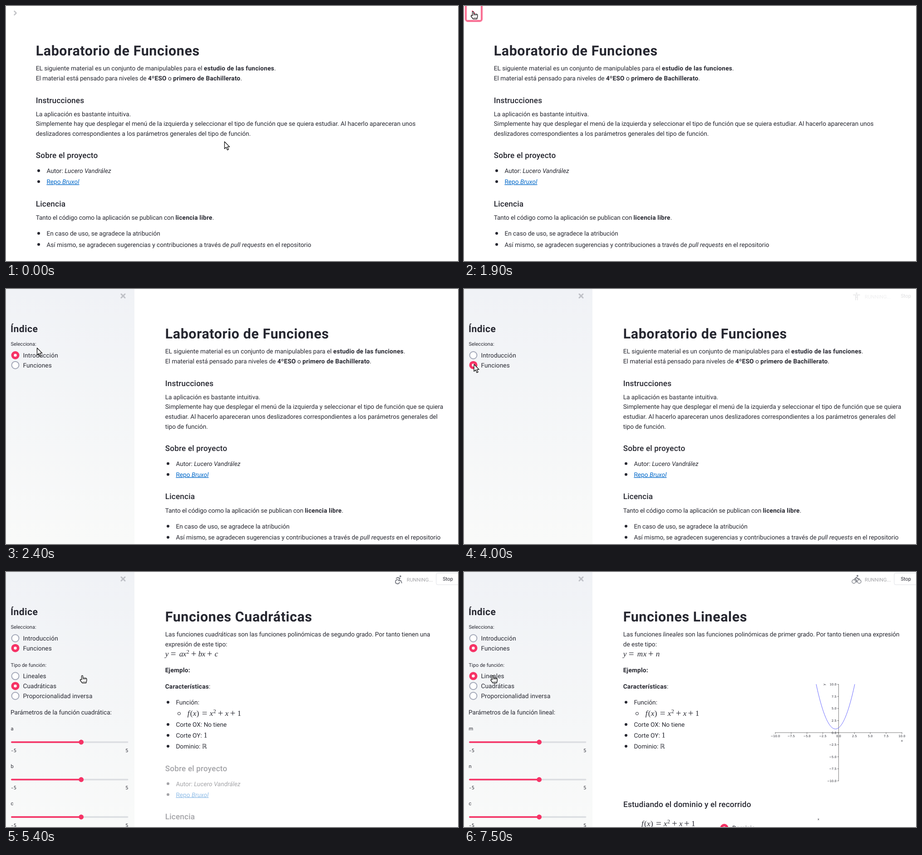
An HTML page for the animation above (8 s loop, 996x562 px).

```html
<!DOCTYPE html>
<html lang="es">
<head>
<meta charset="utf-8">
<title>Laboratorio de Funciones</title>
<style>
html, body { margin: 0; width: 100%; height: 100%; overflow: hidden; background: #fff; }
svg { display: block; width: 100%; height: 100%; }
text { font: 13.67px Roboto, sans-serif; fill: #262730; text-rendering: geometricPrecision; white-space: pre; }
.h1 { font-size: 30.4px; font-weight: 700; letter-spacing: .6px; }
.h2 { font-size: 21px; font-weight: 700; letter-spacing: .45px; }
.h3 { font-size: 17.2px; font-weight: 500; letter-spacing: .16px; }
.small { font-size: 11px; }
.mono { font: 10.5px "Noto Sans Mono", monospace; }
.b { font-weight: 700; letter-spacing: .22px; }
.i { font-style: italic; letter-spacing: .05px; }
.option { letter-spacing: .1px; }
.link { fill: #0068c9; text-decoration: underline; }
.var { font: italic 17px "Liberation Serif", serif; }
.num { font: 17px "Liberation Serif", serif; }
.op { font: 21px "Liberation Serif", serif; }
.sup { font: 12px "Liberation Serif", serif; }
.real { font: 14px "DejaVu Sans", sans-serif; }
.tick { font: 6.7px "DejaVu Sans", sans-serif; }
.end { text-anchor: end; }
.mid { text-anchor: middle; }
.line { fill: none; stroke-linecap: round; stroke-linejoin: round; }
</style>
</head>
<body>
<svg id="stage" viewBox="0 0 996 562"></svg>
<script>
const LOOP = 8000, STEP = 100, PINK = '#f63366', SIDEBAR = 283;
const stage = document.getElementById('stage');

const rich = s => s
  .replace(/\*\*(.+?)\*\*/g, '<tspan class="b">$1</tspan>')
  .replace(/_(.+?)_/g, '<tspan class="i">$1</tspan>');
const text = (x, y, s, cls = '', spacing = 0) =>
  `<text x="${x}" y="${y}" class="${cls}"${spacing ? ` style="letter-spacing:${spacing}px"` : ''}>${rich(s)}</text>`;
const group = (x, y, body, opacity = 1) =>
  `<g transform="translate(${x} ${y})" opacity="${opacity}">${body}</g>`;
const circle = (x, y, r, fill, extra = '') =>
  `<circle cx="${x}" cy="${y}" r="${r}" fill="${fill}" ${extra}/>`;
const line = (d, color, width) =>
  `<path class="line" d="${d}" stroke="${color}" stroke-width="${width}"/>`;
const bullet = (y, s, cls = '', spacing = 0) =>
  circle(6.3, y - 5, 3, '#262730') + text(23.7, y, s, cls, spacing);

// "symbol x symbol x ...", ^ marks an exponent
function math(y, spec) {
  const parts = spec.split(' ');
  let out = '';
  for (let i = 0; i < parts.length; i += 2) {
    const s = parts[i], x = +parts[i + 1];
    if (s[0] === '^') out += text(x, y - 6, s.slice(1), 'sup');
    else if ('=+'.includes(s)) out += text(x, y + 1, s, 'op');
    else out += text(x, y, s, /[a-z]/.test(s) ? 'var' : 'num');
  }
  return out;
}
const EXAMPLE = 'f 1 ( 7 x 13 ) 21 = 33 x 50 ^2 58 + 68 x 84 + 95 1 111';

function about() {
  return text(0, 335, 'Sobre el proyecto', 'h3') +
    bullet(368, 'Autor: _Lucero Vandrález_') +
    bullet(392, 'Repo _Bruxol_', 'link') +
    text(0, 441.5, 'Licencia', 'h3') +
    text(0, 471, 'Tanto el código como la aplicación se publican con **licencia libre**.', '', -.1) +
    bullet(506, 'En caso de uso, se agradece la atribución') +
    bullet(530.5, 'Así mismo, se agradecen sugerencias y contribuciones a través de _pull requests_ en el repositorio');
}

const WRAPS = {
  wide: ['Simplemente hay que desplegar el menú de la izquierda y seleccionar el tipo de función que se quiera estudiar. Al hacerlo apareceran unos',
    'deslizadores correspondientes a los parámetros generales del tipo de función.'],
  medium: ['Simplemente hay que desplegar el menú de la izquierda y seleccionar el tipo de función que se quiera estudiar.',
    'Al hacerlo apareceran unos deslizadores correspondientes a los parámetros generales del tipo de función.'],
  narrow: ['Simplemente hay que desplegar el menú de la izquierda y seleccionar el tipo de función que se quiera',
    'estudiar. Al hacerlo apareceran unos deslizadores correspondientes a los parámetros generales del',
    'tipo de función.']
};

function intro(edge) {
  const rows = WRAPS[edge < 150 ? 'wide' : edge < 250 ? 'medium' : 'narrow'];
  return text(0, 109, 'Laboratorio de Funciones', 'h1') +
    text(0, 142, 'EL siguiente material es un conjunto de manipulables para el **estudio de las funciones**.') +
    text(0, 164, 'El material está pensado para niveles de **4ºESO** o **primero de Bachillerato**.') +
    text(0, 214, 'Instrucciones', 'h3') +
    text(0, 242.5, 'La aplicación es bastante intuitiva.') +
    rows.map((s, i) => text(0, 264 + i * 21.8, s)).join('') +
    group(0, (rows.length - 2) * 21.8, about());
}

function plot() {
  const px = x => 825.5 + x * 13.95, py = y => 354 - y * 10.63;
  const label = v => (v < 0 ? '−' : '') + Math.abs(v).toFixed(1);
  let axes = `M${px(-10)} 354H${px(10)}M825.5 ${py(10)}V${py(-10)}`, labels = '';
  for (let v = -10; v <= 10; v += 2.5) {
    axes += `M${px(v)} 354v2.6M825.5 ${py(v)}h-2.6`;
    labels += text(px(v), 364.3, label(v), 'tick mid') + text(820.7, py(v) + 2.5, label(v), 'tick end');
  }
  const root = Math.sqrt(37) / 2;
  const curve = Array.from({ length: 61 }, (_, i) => {
    const x = -.5 + root * (i / 30 - 1);
    return `${px(x).toFixed(2)} ${py(x * x + x + 1).toFixed(2)}`;
  });
  return line(axes, '#444', .7) + labels + line('M' + curve.join('L'), '#6868ff', 1) +
    text(965, 374, 'x', 'tick mid') +
    `<g transform="translate(796 248) rotate(-90)">${text(0, 0, 'y', 'tick mid')}</g>`;
}

const PAGES = {
  quadratic: ['Funciones Cuadráticas',
    'Las funciones _cuadráticas_ son las funciones polinómicas de segundo grado. Por tanto tienen una',
    'expresión de este tipo:', 'y 0 = 12 a 31 x 39 ^2 47 + 57 b 73 x 81 + 92 c 109'],
  linear: ['Funciones Lineales',
    'Las funciones _lineales_ son las funciones polinómicas de primer grado. Por tanto tienen una expresión',
    'de este tipo:', 'y 0 = 12 m 31 x 44 + 55 n 72']
};

function functionPage(kind) {
  const [title, first, second, formula] = PAGES[kind];
  return text(0, 109, title, 'h1') +
    text(0, 142, first, '', -.05) + text(0, 164, second) + math(186, formula) +
    text(0, 221, '**Ejemplo:**') + text(0, 257, '**Características**:') +
    bullet(292, 'Función:') +
    circle(30.7, 312, 3, 'none', 'stroke="#262730"') + group(48, 0, math(317, EXAMPLE)) +
    bullet(341, 'Corte OX: No tiene') + bullet(365, 'Corte OY: <tspan class="num">1</tspan>') +
    bullet(389, 'Dominio: <tspan class="real">ℝ</tspan>');
}

const domainStudy = () =>
  text(351, 518, 'Estudiando el dominio y el recorrido', 'h3') +
  group(390, 0, math(560, EXAMPLE)) + radio(573.5, 564, true) +
  text(591, 569, 'Dominio') + text(781, 547, 'x', 'tick mid');

function radio(x, y, on, pressed) {
  return on ? circle(x, y, 9, PINK) + circle(x, y, 3.2, '#fff')
    : circle(x, y, 8, pressed ? '#d8dae2' : '#fff', 'stroke="#a3a8b8" stroke-width="2"');
}
const option = (y, label, on, pressed) => radio(20.5, y, on, pressed) + text(37.4, y + 5, label, 'option');

function slider(y, label) {
  return text(10.5, y + 4, label, 'small') +
    `<rect x="11" y="${y + 28.2}" width="258.5" height="3.6" rx="1.8" fill="#dcdee2"/>` +
    `<rect x="11" y="${y + 28.2}" width="155" height="3.6" rx="1.8" fill="${PINK}"/>` +
    circle(165.7, y + 30, 5.4, PINK) +
    text(10.5, y + 51.5, '-5', 'mono') + text(269.5, y + 51.5, '5', 'mono end');
}

function sidebar(t) {
  const functions = t >= 4000, linear = t >= 7500;
  let body = `<rect width="${SIDEBAR}" height="562" fill="url(#shade)"/>` +
    line('M254 11.3l8 8m0 -8l-8 8', '#bfc1c7', 3) +
    text(10, 95, 'Índice', 'h2') + text(10.5, 125, 'Selecciona:', 'small') +
    option(146, 'Introducción', !functions) +
    option(167.7, 'Funciones', functions, t >= 3700);
  if (t >= 4700) {
    body += text(10.5, 208.5, 'Tipo de función:', 'small') +
      option(229.3, 'Lineales', linear) + option(251.2, 'Cuadráticas', !linear) +
      option(273, 'Proporcionalidad inversa', false) +
      text(10, 314, `Parámetros de la función ${linear ? 'lineal' : 'cuadrática'}:`) +
      [...(linear ? 'mnc' : 'abc')].map((s, i) => slider(345 + i * 82.5, s)).join('');
  }
  return body;
}

// head position, limbs, optional wheels
const ICONS = {
  stand: [0, -6.5, 'M-7 -3H7M-2 -3V8M2 -3V8M-2 2H2'],
  run: [3, -6.5, 'M-6 0L-3 -3H2L0 2L4 4V9M0 2L-2 6H-7M2 -3L5 0H7'],
  chair: [4, -6.5, 'M-5 -2L-2 -4L3 -2L0 3H5L7 8M-2 1a4.5 4.5 0 1 0 4 6'],
  bike: [2, -7.5, 'M0 6V2L-4 -1L0 -4L3 -1H6', 'M-10 5a4 4 0 1 0 8 0a4 4 0 1 0 -8 0M2 5a4 4 0 1 0 8 0a4 4 0 1 0 -8 0']
};
const ICON_TIMES = [[4000, 'stand'], [4700, 'run'], [5400, 'chair'], [5900, 'run'], [6200, 'stand'], [6500, 'chair'], [7500, 'bike']];

function status(t) {
  if (t < 4000 || (t >= 7000 && t < 7500)) return '';
  const faint = t < 4700;
  const [hx, hy, limbs, wheels] = ICONS[ICON_TIMES.filter(r => r[0] <= t).pop()[1]];
  const icon = circle(hx, hy, 1.9, '#777a82') + line(limbs, '#777a82', 1.9) + (wheels ? line(wheels, '#777a82', 1.3) : '');
  const button = faint ? '' : '<rect x="948" y="2.5" width="60" height="25.5" rx="3.5" fill="#fff" stroke="#dfe1e6"/>';
  return group(865, 16, icon, faint ? .15 : 1) +
    `<g opacity="${faint ? .07 : .42}">${text(883, 21, 'RUNNING...', 'small', .1)}</g>` +
    button + `<g opacity="${faint ? .15 : 1}">${text(962.5, 19, 'Stop', 'small')}</g>`;
}

function menuButton(t) {
  const hover = t >= 1600, focus = t >= 1800;
  const frame = (w, o) => `<rect x="4" y="-8" width="35" height="41" rx="4" fill="none" stroke="${PINK}" stroke-width="${w}" opacity="${o}"/>`;
  return (focus ? frame(5, .45) : '') + (hover ? frame(1.3, 1) : '') +
    line('M18.5 11.5l4 4l-4 4', hover ? PINK : '#c3c4c8', 2.6);
}

// glide start, glide end, x, y
const CURSOR = [
  [0, 0, 481.5, 299], [500, 800, 190, 187], [1000, 1800, 19, 12.5], [2300, 2400, 68.5, 130],
  [3300, 3400, 22, 166], [4700, 4700, 190, 240], [5400, 5400, 167, 228.5], [5900, 5900, 62.5, 228.5]
];

function cursor(t) {
  const i = CURSOR.findLastIndex(r => r[0] <= t);
  const [start, end, x, y] = CURSOR[i], from = CURSOR[Math.max(0, i - 1)];
  const p = Math.sin(Math.min(1, (t - start + STEP) / (end - start + STEP)) * Math.PI / 2);
  const hand = (t >= 1600 && t < 2000) || t >= 5400;
  const shape = hand
    ? 'M-.5 9V1.2a1.5 1.5 0 0 1 3 0V5.5H8.5q2.3 .3 2.3 2.5V11l-1.3 5H1L-3.3 10.5q-.8 -2 1 -2.4z'
    : 'M0 0V15.6L3.7 12.3L6.3 18.4L9 17.2L6.4 11.4H11.2Z';
  const detail = hand ? line('M2.5 9V6M5.3 9V6.6M8 9V6.8M2 13.4H8.5', '#111', .7) : '';
  return group(from[2] + (x - from[2]) * p, from[3] + (y - from[3]) * p,
    `<path d="${shape}" fill="#fff" stroke="#111" stroke-width="1.3" stroke-linejoin="round"/>` + detail);
}

function main(t, edge) {
  const x = 65.7 + edge * 285 / SIDEBAR;
  if (t < 5400) return group(x, 0, intro(edge), t < 4700 ? 1 : .8);
  let body = group(x, 0, functionPage(t < 7500 ? 'quadratic' : 'linear'));
  if (t >= 5900) body += plot();
  return body + (t < 7000 ? group(x, t < 5900 ? 103.5 : 183, about(), .42) : domainStudy());
}

const SLIDE = { 2000: 72, 2100: 231, 2200: 277 };
const SHADE = '<defs><linearGradient id="shade" x2="0" y2="1"><stop stop-color="#f0f2f6"/><stop offset="1" stop-color="#f9faf9"/></linearGradient></defs>';

function scene(t) {
  const edge = t < 2000 ? 0 : SLIDE[t] || SIDEBAR;
  return SHADE + main(t, edge) +
    (edge ? group(edge - SIDEBAR, 0, sidebar(t)) : menuButton(t)) + status(t) + cursor(t);
}

const started = performance.now();
let shown = -1;
function tick() {
  const t = Math.floor((performance.now() - started) % LOOP / STEP) * STEP;
  if (t !== shown) stage.innerHTML = scene(shown = t);
  requestAnimationFrame(tick);
}
tick();
</script>
</body>
</html>
```
